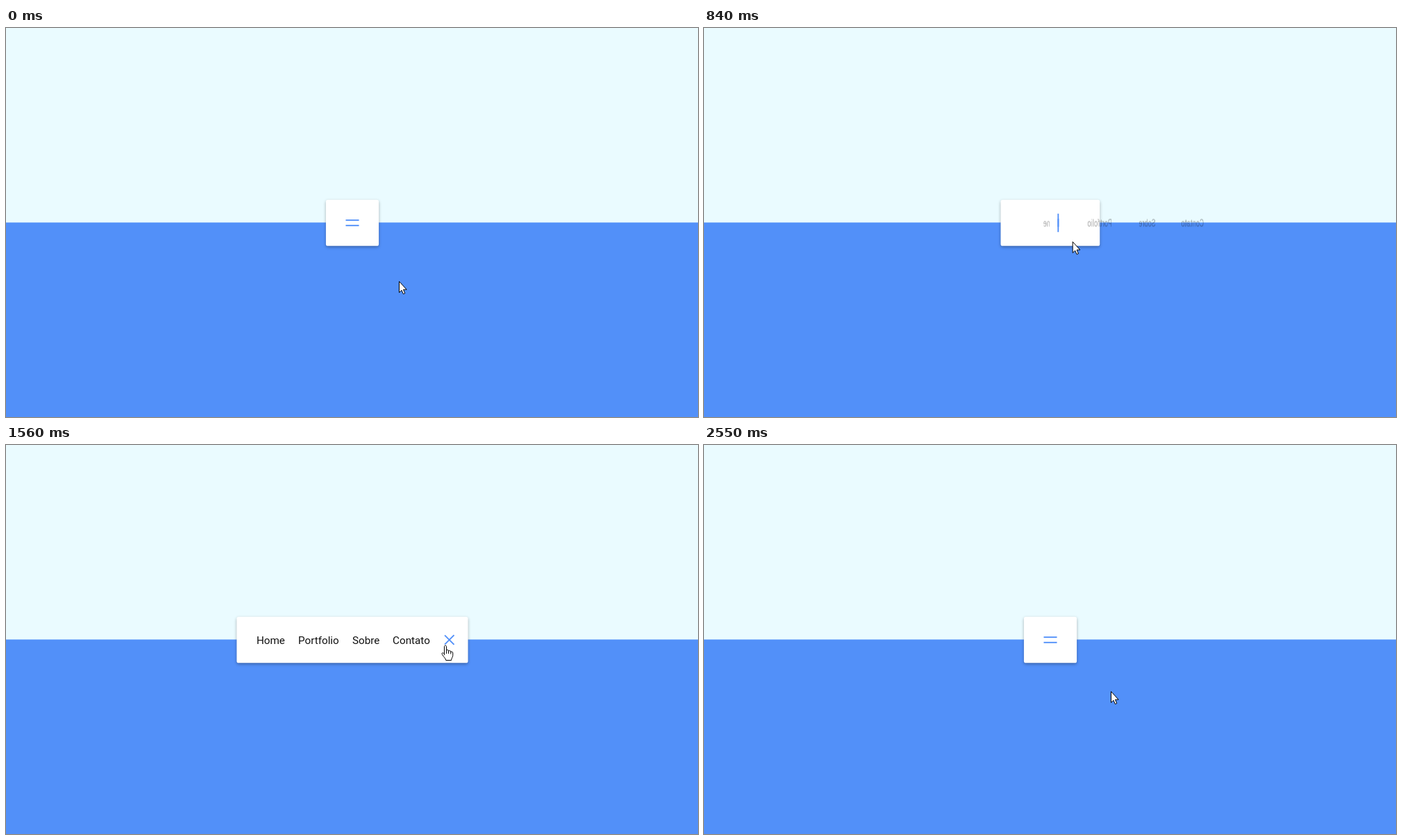
An HTML page for the animation above (2580 ms loop, 997 by 561 pixels).

```html
<!DOCTYPE html>
<html lang="pt">
<head>
<meta charset="utf-8">
<title>Menu</title>
<style>
* { box-sizing: border-box; }
html, body { margin: 0; width: 100%; height: 100%; overflow: hidden; }
body { position: relative; background: linear-gradient(#eafbff 280px, #5290f9 281px); font: 16px Roboto, sans-serif; color: #111; }
nav {
  position: absolute; left: 498.5px; top: 280.5px; width: 80px; height: 70px; padding: 20px;
  display: flex; align-items: center; justify-content: center;
  background: #fff; border-radius: 3px; box-shadow: 0 2px 5px rgba(0, 0, 0, .3);
  transform: translate(-50%, -50%) scale(.952);
}
ul { display: flex; list-style: none; margin: 0; padding: 0; width: 0; }
li span { margin: 0 10px; }
.icon { position: relative; z-index: 1; width: 30px; height: 30px; background: #fff; }
.line { position: absolute; left: 5px; top: 10px; width: 20px; height: 2px; background: #5290f9; }
.line + .line { top: 18px; }
svg { position: absolute; left: 0; top: 0; width: 100%; height: 100%; fill: #fff; stroke: #000; stroke-linejoin: round; }
</style>
</head>
<body>
<nav>
  <ul>
    <li><span>Home</span></li>
    <li><span>Portfolio</span></li>
    <li><span>Sobre</span></li>
    <li><span>Contato</span></li>
  </ul>
  <div class="icon"><div class="line"></div><div class="line"></div></div>
</nav>
<svg>
  <g id="cursor">
    <path id="arrow" d="M.5 .5V16.5L4 13.2L6.4 18.6L8.8 17.6L6.5 12.2H11.2Z"/>
    <path id="hand" d="M-1.5 12.5V1.7C-1.5-.3 1.6-.3 1.6 1.7V7.5C2 6 4.6 6 4.6 8V8.6C5.2 7 7.8 7.2 7.8 9.2V9.8C8.6 8.6 10.8 8.8 10.8 11V14.5C10.8 17 8.6 18.5 8.6 21.5H.8C.5 18.5-2.5 17-4.8 12.5C-5.6 10.6-3.2 9.8-1.5 12.5ZV14M1.6 7.5V12M4.6 8.5V12M7.8 9.5V12.5"/>
  </g>
</svg>
<script>
const LOOP = 2580, OPEN = 682, CLOSE = 1849, DURATION = 450;
const $ = s => document.querySelector(s);
const nav = $('nav'), list = $('ul'), items = document.querySelectorAll('li');
const [line1, line2] = document.querySelectorAll('.line');

// time, x, y
const pointerKeys = [
  [0, 566, 365], [30, 566, 365], [540, 506, 279], [700, 506, 279],
  [1020, 566, 349], [1110, 566, 351], [1560, 633, 289], [1650, 637, 283],
  [1980, 637, 283], [2160, 624, 290], [2520, 586, 355], [LOOP, 586, 355]
];

const clamp = v => Math.min(1, Math.max(0, v));
const smooth = u => u * u * (3 - 2 * u);

// cubic-bezier(.42, 0, .58, 1)
function easeInOut(x) {
  let lo = 0, hi = 1;
  for (let i = 0; i < 24; i++) {
    const u = (lo + hi) / 2, v = 1 - u;
    if (1.26 * v * v * u + 1.74 * v * u * u + u ** 3 < x) lo = u; else hi = u;
  }
  return smooth(lo);
}

function drawMenu(t) {
  const turn = clamp((t - OPEN) / DURATION) - clamp((t - CLOSE) / DURATION);
  const grow = easeInOut(turn);
  nav.style.width = 80 + 270 * grow + 'px';
  list.style.width = 100 * grow + '%';
  for (const { style } of items) {
    style.opacity = turn;
    style.transform = `rotateY(${360 * turn}deg)`;
  }
  line1.style.transform = `rotate(${-765 * turn}deg) translateY(${5.5 * turn}px)`;
  line2.style.transform = `rotate(${765 * turn}deg) translateY(${-5.5 * turn}px)`;
}

function drawPointer(t) {
  const next = pointerKeys.findIndex(k => k[0] > t);
  const [t0, x0, y0] = pointerKeys[next - 1], [t1, x1, y1] = pointerKeys[next];
  const u = smooth((t - t0) / (t1 - t0));
  $('#cursor').setAttribute('transform', `translate(${x0 + (x1 - x0) * u} ${y0 + (y1 - y0) * u})`);
  const pointing = (t > 390 && t < 810) || (t > 1500 && t < 2040);
  $('#hand').style.display = pointing ? '' : 'none';
  $('#arrow').style.display = pointing ? 'none' : '';
}

const start = performance.now();
function frame() {
  const t = (performance.now() - start) % LOOP;
  drawMenu(t);
  drawPointer(t);
  requestAnimationFrame(frame);
}
frame();
</script>
</body>
</html>
```
